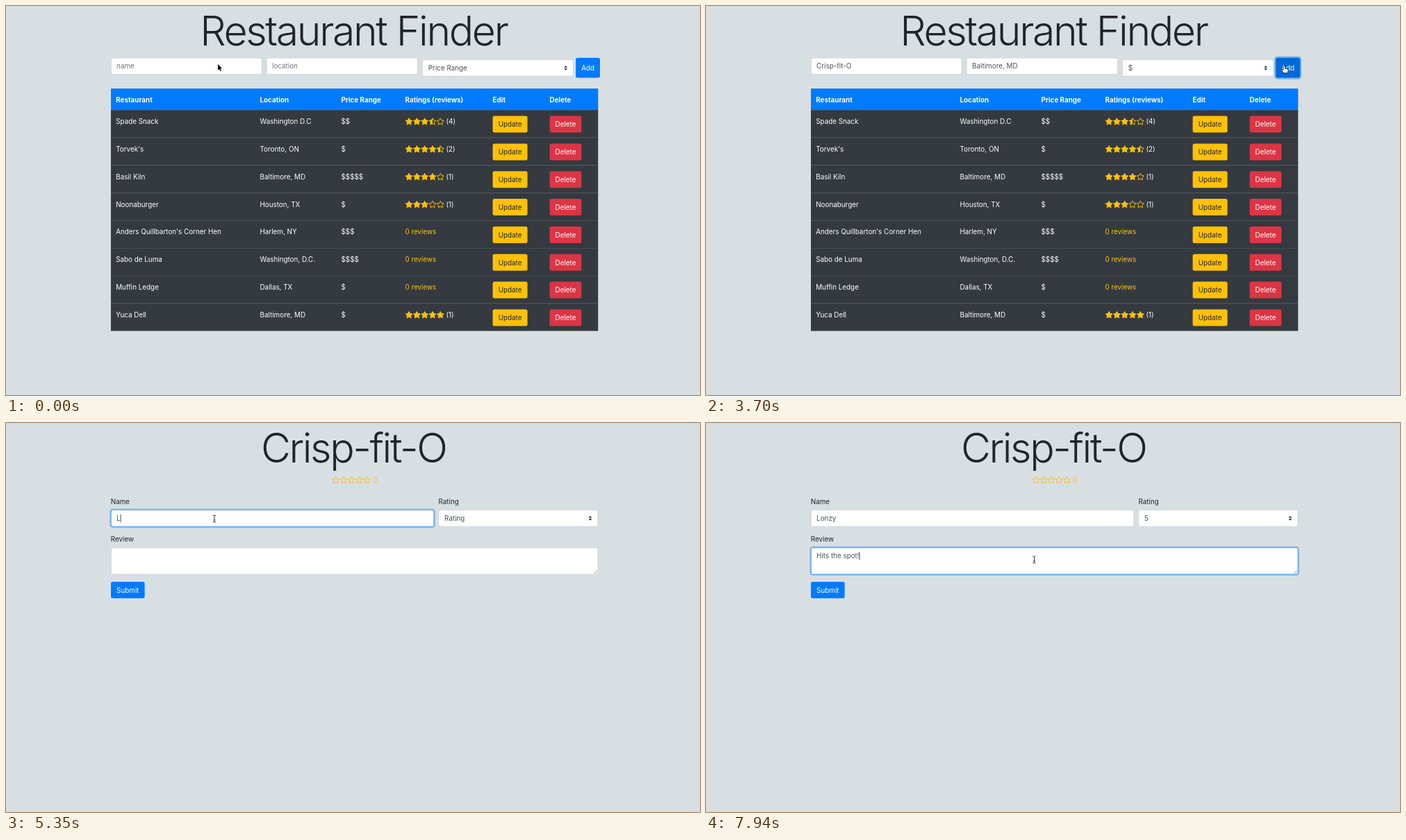
An HTML page with a canvas that plays this animation: 999x561 px, repeating every 7990 ms.

```html
<!DOCTYPE html>
<html lang="en">
<head>
<meta charset="utf-8">
<title>Restaurant Finder</title>
<style>
html, body { margin: 0; width: 100%; height: 100%; overflow: hidden; background: #d8dfe2; }
canvas { display: block; width: 999px; height: 561px; }
</style>
</head>
<body>
<canvas id="stage"></canvas>
<script>
const LOOP = 7990, W = 999, H = 561;
const BLUE = '#007bff', GOLD = '#ffc107', RED = '#dc3545', INK = '#212529', FIELD = '#495057', HINT = '#6c757d';
const FONT = 'Inter, "Liberation Sans", sans-serif';
const ROW = 39.83, BODY = 150;
const NEW_NAME = 'Crisp-fit-O', CITY = 'Baltimore, MD', PERSON = 'Lonzy', REVIEW = 'Hits the spot!';

const canvas = document.getElementById('stage');
const ctx = canvas.getContext('2d');
const dpr = window.devicePixelRatio || 1;
canvas.width = W * dpr;
canvas.height = H * dpr;

// name, location, price, stars, review count
const places = [
  ['Spade Snack', 'Washington D.C', 2, 3.5, 4],
  ["Torvek's", 'Toronto, ON', 1, 4.5, 2],
  ['Basil Kiln', 'Baltimore, MD', 5, 4, 1],
  ['Noonaburger', 'Houston, TX', 1, 3, 1],
  ["Anders Quillbarton's Corner Hen", 'Harlem, NY', 3, 0, 0],
  ['Sabo de Luma', 'Washington, D.C.', 4, 0, 0],
  ['Muffin Ledge', 'Dallas, TX', 1, 0, 0],
  ['Yuca Dell', 'Baltimore, MD', 1, 5, 1]
];
const added = [NEW_NAME, CITY, 1, 0, 0];

// time, x, y of the pointer's hot spot
const path = [
  [0, 305, 84], [1300, 305, 84], [1550, 424, 89], [2480, 424, 89], [2660, 690, 90], [2740, 690, 90],
  [2870, 673.5, 151], [2920, 672, 154], [3050, 640, 104], [3120, 640, 104], [3430, 832.5, 87],
  [3740, 832.5, 87], [3890, 700, 365], [4230, 341, 506], [4350, 335.5, 493], [4560, 335.5, 493],
  [4760, 300, 138], [5890, 300, 138], [6200, 658, 140], [6500, 658, 150], [6660, 658, 150],
  [6800, 656, 206], [6870, 656, 206], [7040, 472.5, 197]
];

// time, focused control, fade length
const focusLog = [
  [0, '', 1], [150, 'city', 1], [300, 'name', 100], [1550, 'city', 100], [2700, 'price', 100],
  [3500, 'add', 100], [4760, 'who', 50], [6240, 'rating', 100], [7000, 'review', 100]
];

const clamp = (v, a = 0, b = 1) => Math.max(a, Math.min(b, v));
const within = (t, a, b) => t >= a && t < b;

function pointer(t) {
  let i = path.length - 1;
  while (i > 0 && path[i][0] > t) i--;
  const a = path[i], b = path[i + 1] || a;
  const p = clamp((t - a[0]) / (b[0] - a[0] || 1));
  const e = p * p * (3 - 2 * p);
  return { x: a[1] + (b[1] - a[1]) * e, y: a[2] + (b[2] - a[2]) * e };
}

function focusOf(id, t) {
  let i = focusLog.length - 1;
  while (i > 0 && focusLog[i][0] > t) i--;
  const [start, now, fade] = focusLog[i];
  const p = clamp((t - start) / fade);
  if (now === id) return p;
  return i && focusLog[i - 1][1] === id ? 1 - p : 0;
}

// bursts: first key time, last key time, number of keys
function typed(str, t, bursts) {
  let n = 0;
  for (const [a, b, k] of bursts) {
    if (t >= a) n += Math.min(k, 1 + Math.floor((t - a) * (k - 1) / (b - a || 1) + 1e-6));
  }
  return str.slice(0, n);
}

function text(str, x, mid, color = INK, weight = 400, size = 9.85, align = 'left') {
  ctx.font = `${weight} ${size}px ${FONT}`;
  ctx.textAlign = align;
  ctx.fillStyle = color;
  ctx.fillText(str, x, mid + size * 0.36);
}

function title(str) {
  const tracking = -2.4;
  ctx.letterSpacing = tracking + 'px';
  ctx.font = `300 59px ${FONT}`;
  ctx.textAlign = 'center';
  ctx.fillStyle = INK;
  ctx.fillText(str, 501.5 + tracking / 2, 57);
  ctx.letterSpacing = '0px';
}

function box(x, y, w, h, r, fill, stroke, line = 0.8) {
  ctx.beginPath();
  ctx.roundRect(x, y, w, h, r);
  if (fill) { ctx.fillStyle = fill; ctx.fill(); }
  if (stroke) { ctx.strokeStyle = stroke; ctx.lineWidth = line; ctx.stroke(); }
}

function ring(x, y, w, h, alpha, strength) {
  if (alpha > 0) box(x - 1, y - 1, w + 2, h + 2, 3.5, null, `rgba(0,123,255,${strength * alpha})`, 2);
}

function button(label, x, y, w, h, fill, color = '#fff') {
  box(x, y, w, h, 2.5, fill);
  text(label, x + w / 2, y + h / 2 + 0.3, color, 400, 9.85, 'center');
}

function field(id, t, x, y, w, h, value, hint) {
  const f = focusOf(id, t), mid = y + 11.9;
  box(x, y, w, h, 2.5, '#fff', '#ced4da');
  if (f > 0) {
    box(x, y, w, h, 2.5, null, `rgba(128,189,255,${f})`);
    ring(x, y, w, h, f, 0.4);
  }
  text(value || hint, x + 7.7, mid, value ? FIELD : HINT);
  if (f > 0.5 && !within(t, 5000, 5150)) {
    ctx.fillStyle = '#222';
    ctx.fillRect(x + 7.7 + (value ? ctx.measureText(value).width : 0), mid - 5.8, 0.8, 11.6);
  }
}

function select(id, t, x, y, w, h, value) {
  const f = focusOf(id, t), ax = x + w - 10.8, mid = y + h / 2;
  box(x, y, w, h, 2.5, '#fff', '#ced4da');
  if (f > 0) {
    box(x, y, w, h, 2.5, null, `rgba(128,189,255,${f})`);
    ring(x, y, w, h, f, 0.4);
  }
  text(value, x + 8.3, mid + 0.2, FIELD);
  ctx.fillStyle = '#343a40';
  for (const s of [-1, 1]) {
    ctx.beginPath();
    ctx.moveTo(ax - 2.5, mid + s * 0.7);
    ctx.lineTo(ax + 2.5, mid + s * 0.7);
    ctx.lineTo(ax, mid + s * 3.4);
    ctx.fill();
  }
}

function menu(x, y, w, shades, items, hot) {
  const h = 89.5, step = 13.88;
  const g = ctx.createLinearGradient(0, y, 0, y + h);
  shades.forEach((c, i) => g.addColorStop(i / (shades.length - 1), c));
  ctx.save();
  ctx.shadowColor = 'rgba(0,0,0,.38)';
  ctx.shadowBlur = 10 * dpr;
  ctx.shadowOffsetY = 4 * dpr;
  box(x, y, w, h, 3, g);
  ctx.restore();
  items.forEach((label, i) => {
    const mid = y + 9.3 + i * step;
    if (i && i === hot) {
      ctx.fillStyle = '#1e78ee';
      ctx.fillRect(x, mid - 6.9, w, step);
    }
    text(label, x + 13.6, mid, i ? '#fff' : 'rgba(255,255,255,.5)', i ? 500 : 400, 10.2);
  });
  ctx.strokeStyle = 'rgba(255,255,255,.55)';
  ctx.lineWidth = 1;
  ctx.beginPath();
  ctx.moveTo(x + 4.2, y + 10);
  ctx.lineTo(x + 6, y + 12.3);
  ctx.lineTo(x + 9.3, y + 6.8);
  ctx.stroke();
}

const hotItem = (y, cy) => Math.floor((cy - y - 2) / 13.88);

function starPath(cx, cy, r) {
  ctx.beginPath();
  for (let i = 0; i < 10; i++) {
    const a = -Math.PI / 2 + i * Math.PI / 5, d = i % 2 ? r * 0.52 : r;
    ctx.lineTo(cx + d * Math.cos(a), cy + d * Math.sin(a));
  }
  ctx.closePath();
}

function stars(x, mid, score) {
  ctx.fillStyle = ctx.strokeStyle = GOLD;
  ctx.lineJoin = 'round';
  ctx.lineWidth = 1;
  for (let i = 0; i < 5; i++) {
    const cx = x + 5.6 + i * 11.3, part = clamp(score - i);
    starPath(cx, mid + 0.3, 5.2);
    ctx.stroke();
    if (part > 0) {
      ctx.save();
      ctx.beginPath();
      ctx.rect(cx - 7, mid - 7, 14 * part, 14);
      ctx.clip();
      starPath(cx, mid + 0.3, 5.2);
      ctx.fill();
      ctx.restore();
    }
  }
  ctx.lineJoin = 'miter';
}

function tableRow(place, i, hover) {
  const [name, city, price, score, count] = place;
  const y = BODY + i * ROW, mid = y + 16.6;
  ctx.fillStyle = hover ? '#43494e' : '#343a40';
  ctx.fillRect(151, y, 701.3, ROW);
  ctx.fillStyle = '#454d55';
  ctx.fillRect(151, y, 701.3, 0.7);
  text(name, 158.2, mid, '#fff');
  text(city, 365.5, mid, '#fff');
  text('$'.repeat(price), 482.5, mid, '#fff');
  if (count) {
    stars(574.5, mid, score);
    text(`(${count})`, 633.5, mid, '#fff');
  } else {
    text('0 reviews', 574.5, mid, GOLD);
  }
  button('Update', 700.6, y + 8.6, 50, 24, GOLD, INK);
  button('Delete', 782.6, y + 8.6, 45.8, 24, RED);
}

function listPage(t, at) {
  title('Restaurant Finder');
  field('name', t, 151.4, 75, 216.6, 23.5, typed(NEW_NAME, t, [[550, 740, 5], [890, 1040, 4], [1190, 1240, 2]]), 'name');
  field('city', t, 375.3, 75, 217, 23.5, typed(CITY, t, [[1820, 2140, 9], [2290, 2440, 4]]), 'location');
  select('price', t, 599.5, 77.6, 217, 23.5, t < 3110 ? 'Price Range' : '$');
  const overAdd = at.x > 820 && at.x < 855 && at.y > 74 && at.y < 104;
  button('Add', 820.2, 74.7, 34.8, 28.8, overAdd ? '#0069d9' : BLUE);
  ring(820.2, 74.7, 34.8, 28.8, focusOf('add', t), 0.5);

  ctx.fillStyle = BLUE;
  ctx.fillRect(151, 119, 701.3, 31.2);
  const heads = { Restaurant: 158.2, Location: 365.5, 'Price Range': 482.5, 'Ratings (reviews)': 574.5, Edit: 700.6, Delete: 782.6 };
  for (const label in heads) text(label, heads[label], 135, '#fff', 700);
  const rows = t < 3790 ? places : [...places, added];
  const over = t > 3740 ? Math.floor((at.y - BODY) / ROW) : -1;
  rows.forEach((p, i) => tableRow(p, i, i === over));

  if (within(t, 2700, 3110)) {
    menu(592.6, 80, 219, ['#5d686f', '#50667f', '#3f5f90', '#375684', '#39475a'],
      ['Price Range', '$', '$$', '$$$', '$$$$', '$$$$$'], hotItem(80, at.y));
  }
}

function card() {
  box(141.5, 100, 216, 72.4, 2.5, BLUE);
  box(141.5, 100, 216, 31.3, [2.5, 2.5, 0, 0], 'rgba(0,0,0,.04)');
  ctx.fillStyle = 'rgba(0,0,0,.125)';
  ctx.fillRect(141.5, 130.8, 216, 0.7);
  box(141.8, 100.3, 215.4, 71.8, 2.5, null, 'rgba(0,0,0,.125)', 0.6);
  text(PERSON, 154.4, 116.2, '#fff');
  stars(287.5, 116, 5);
  text(REVIEW, 154.4, 152.2, '#fff');
}

function detailPage(t, at) {
  const stale = t < 4600, dy = stale ? 82.7 : 0;
  title(stale ? places[7][0] : NEW_NAME);
  stars(stale ? 466 : 469, 82.5, stale ? 5 : 0);
  text(stale ? '(1)' : '0', stale ? 525.5 : 528, 82.7, GOLD);
  if (stale) card();

  ctx.save();
  ctx.translate(0, dy);
  text('Name', 150.8, 113);
  text('Rating', 622.5, 113);
  text('Review', 150.8, 167.3);
  field('who', t, 151.4, 125.6, 464.4, 23.6, typed(PERSON, t, [[5350, 5740, 5]]), 'name');
  select('rating', t, 622.8, 125.6, 229, 23.6, t < 6860 ? 'Rating' : '5');
  field('review', t, 151.4, 180, 700.6, 38, typed(REVIEW, t, [[7250, 7790, 13], [7940, 7940, 1]]), '');
  ctx.strokeStyle = '#777';
  ctx.lineWidth = 0.6;
  ctx.beginPath();
  for (const d of [5, 2.5]) {
    ctx.moveTo(851 - d, 217);
    ctx.lineTo(851, 217 - d);
  }
  ctx.stroke();
  button('Submit', 151, 229, 48.6, 23.7, BLUE);
  ctx.restore();

  if (within(t, 6240, 6860)) {
    menu(615.6, 127.6, 231, ['#7e8385', '#77797a', '#727475', '#757879', '#777b7d'],
      ['Rating', '1', '2', '3', '4', '5'], t > 6600 ? hotItem(127.6, at.y) : 0);
  }
}

function outline(points, fill, stroke, line) {
  ctx.beginPath();
  for (const [x, y] of points) ctx.lineTo(x, y);
  ctx.closePath();
  ctx.lineJoin = 'round';
  ctx.lineWidth = line;
  ctx.strokeStyle = stroke;
  ctx.stroke();
  ctx.fillStyle = fill;
  ctx.fill();
  ctx.lineJoin = 'miter';
}

const ARROW = [[0, 0], [0, 8.6], [2, 6.9], [3.4, 10], [4.8, 9.4], [3.5, 6.3], [6, 6.1]];
const HAND = [[-1, 0], [0.6, 0], [0.9, 3.6], [4.6, 4.3], [5.2, 5], [4.6, 9.2], [-1, 9.2], [-3.4, 5.4], [-2.8, 4.7], [-1, 6]];

function drawPointer(t, { x, y }) {
  const beam = within(t, 300, 2500) || within(t, 4740, 6000) || t >= 6960;
  const hand = within(t, 3400, 3755);
  ctx.save();
  ctx.translate(x, y);
  if (beam) {
    for (const [color, line] of [['rgba(255,255,255,.8)', 2], ['#222', 0.9]]) {
      ctx.strokeStyle = color;
      ctx.lineWidth = line;
      ctx.beginPath();
      ctx.moveTo(-2.2, -5);
      ctx.quadraticCurveTo(0, -5, 0, -3.6);
      ctx.lineTo(0, 3.6);
      ctx.quadraticCurveTo(0, 5, -2.2, 5);
      ctx.moveTo(2.2, -5);
      ctx.quadraticCurveTo(0, -5, 0, -3.6);
      ctx.moveTo(0, 3.6);
      ctx.quadraticCurveTo(0, 5, 2.2, 5);
      ctx.moveTo(-1.3, 2);
      ctx.lineTo(1.3, 2);
      ctx.stroke();
    }
  } else if (hand) {
    outline(HAND, '#fff', '#111', 1.5);
  } else {
    outline(ARROW, '#000', '#fff', 1.3);
  }
  ctx.restore();
}

function draw() {
  const t = performance.now() % LOOP, at = pointer(t);
  ctx.setTransform(dpr, 0, 0, dpr, 0, 0);
  ctx.fillStyle = '#d8dfe2';
  ctx.fillRect(0, 0, W, H);
  (t < 4500 ? listPage : detailPage)(t, at);
  drawPointer(t, at);
  requestAnimationFrame(draw);
}
draw();
</script>
</body>
</html>
```
